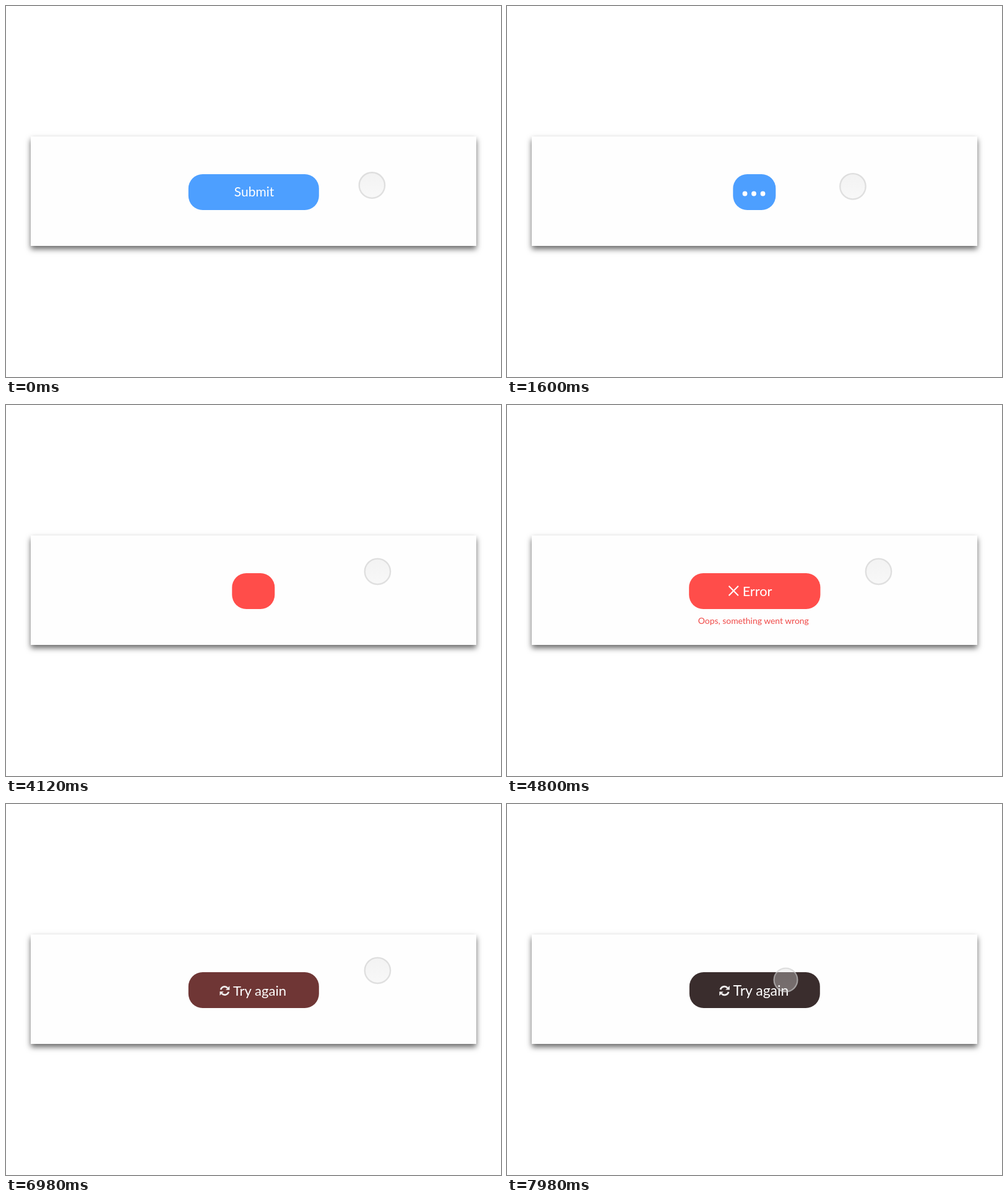
Animation of 800x600 px, one loop 8000 ms. Source, as an HTML page:

```html
<!DOCTYPE html>
<html lang="en">
<head>
<meta charset="utf-8">
<title>Submit button states</title>
<style>
  html, body { margin: 0; width: 100%; height: 100%; overflow: hidden; background: #fff; }
  #stage { position: relative; width: 800px; height: 600px; overflow: hidden; }
  #panel { position: absolute; left: 40px; top: 211px; width: 720px; height: 177px;
    background: #fefefe; box-shadow: 0 5px 9px rgba(0, 0, 0, .6); }
  svg { position: absolute; left: 0; top: 0; }
  text { font-family: Lato, "Open Sans", sans-serif; text-anchor: middle; fill: #fff; }
</style>
</head>
<body>
<div id="stage">
  <div id="panel"></div>
  <svg width="800" height="600" viewBox="0 0 800 600">
    <defs>
      <linearGradient id="glass" x1="0" y1="0" x2="0" y2="1">
        <stop offset="0" stop-color="#dcdcdc"/>
        <stop offset="1" stop-color="#ededed"/>
      </linearGradient>
    </defs>
    <text id="hint" x="398.3" font-size="13.9" style="fill:#f04a48">Oops, something went wrong</text>
    <rect id="button" y="272" height="58" rx="23"/>
    <g id="submit"><text x="401" y="308" font-size="21">Submit</text></g>
    <g id="dots" fill="#fff">
      <circle cx="384.5" r="3.9"/><circle cx="399" r="3.9"/><circle cx="413.5" r="3.9"/>
    </g>
    <g id="error">
      <path d="M361.5 293.5l14 14m0-14l-14 14" stroke="#fff" stroke-width="1.9"/>
      <text x="403.5" y="308" font-size="19.8">Error</text>
    </g>
    <g id="retry">
      <g id="sync" transform="translate(351.5 302)">
        <g id="half">
          <path d="M-6.6 -1.8A6.7 6.7 0 0 1 4.9 -4.6" fill="none" stroke="#f0eeee" stroke-width="2.7"/>
          <path d="M8.3 -8v6.6h-6.6z" fill="#f0eeee"/>
        </g>
        <use href="#half" transform="rotate(180)"/>
      </g>
      <text x="410.5" y="310.3" font-size="23">Try again</text>
    </g>
    <g id="cursor">
      <circle r="21.5" fill="url(#glass)" fill-opacity=".34"/>
      <circle r="20.7" fill="none" stroke="#cdcdcd" stroke-opacity=".55" stroke-width="2.4"/>
    </g>
  </svg>
</div>
<script>
const LOOP = 8000;
const BLUE = [77, 159, 255], RED = [255, 77, 74], DARK = [58, 45, 45];
const $ = id => document.getElementById(id);
const [hint, button, submit, error, retry, cursor, dots] =
  ['hint', 'button', 'submit', 'error', 'retry', 'cursor', 'dots'].map($);

const prog = (t, from, to) => Math.min(1, Math.max(0, (t - from) / (to - from)));
const mix = (a, b, p) => a + (b - a) * p;
const inOut = p => p < .5 ? 2 * p * p : 1 - 2 * (1 - p) ** 2;
const cubicOut = p => 1 - (1 - p) ** 3;
const mixColor = (a, b, p) => `rgb(${a.map((v, i) => Math.round(mix(v, b[i], p)))})`;

// Damped spring from 0 to 1 with about 15% overshoot
function spring(t, start) {
  if (t <= start) return 0;
  const w = 7.7 * (t - start) / 1000, k = .593;
  return 1 - Math.exp(-k * w) * (Math.cos(w) + k * Math.sin(w));
}

function scaleAt(el, x, y, s, opacity) {
  el.setAttribute('transform', `translate(${x} ${y}) scale(${s}) translate(${-x} ${-y})`);
  el.setAttribute('opacity', opacity);
}

function drawButton(t) {
  const shrink = inOut(prog(t, 1020, 1400));
  const width = t < 4140 ? mix(211, 69, shrink) : mix(69, 211, spring(t, 4140));
  button.setAttribute('x', 400.3 - width / 2 - (width < 140 ? .5 : 0));
  button.setAttribute('width', width);
  button.setAttribute('fill', t < 6000
    ? mixColor(BLUE, RED, prog(t, 3880, 4090))
    : mixColor(RED, DARK, cubicOut(prog(t, 6845, 7230))));
}

function drawDots(t) {
  dots.setAttribute('opacity', prog(t, 1340, 1480) * (1 - prog(t, 3860, 3980)));
  [...dots.children].forEach((dot, i) => {
    const p = t < 1808 ? 0 : prog((t - 1808) % 800, i * 200, i * 200 + 400);
    dot.setAttribute('cy', 303.5 - 9.5 * Math.sin(Math.PI * p) ** 2);
  });
}

function drawLabels(t) {
  scaleAt(submit, 401, 300, 1 - .3 * prog(t, 1020, 1160), 1 - prog(t, 1020, 1160));

  const leave = prog(t, 6500, 6640);
  scaleAt(error, 393, 300.5, spring(t, 4270) * (1 - .4 * leave), 1 - leave);

  const rise = prog(t, 6484, 6640) ** 1.15;
  hint.setAttribute('y', mix(306, 351, spring(t, 4500) * (1 - rise)));
  hint.setAttribute('opacity', t > 4500 && t < 6640 ? 1 : 0);

  const pop = prog(t, 6850, 7120);
  scaleAt(retry, 399, 302, mix(.7, 1, cubicOut(pop)), prog(t, 6850, 6950));
}

function drawCursor(t) {
  let x, y;
  if (t < 1220) {
    const s = inOut(prog(t, 330, 850));
    x = mix(591.5, 424, s);
    y = mix(290, 289, s);
  } else if (t < 7000) {
    const s = inOut(prog(t, 1220, 1800));
    x = mix(424, 600.5, s);
    y = 289 + 10 * Math.sin(Math.PI * s) - 19.7 * s ** 6;
  } else {
    const s = inOut(prog(t, 7150, 7825));
    x = mix(600.5, 450.5, s);
    y = mix(269.3, 284.5, s);
  }
  const press = prog(t, 940, 1000) - prog(t, 1040, 1140) + prog(t, 7960, 8010);
  cursor.setAttribute('transform', `translate(${x} ${y}) scale(${1 - .2 * press})`);
}

function frame() {
  const t = performance.now() % LOOP;
  drawButton(t);
  drawDots(t);
  drawLabels(t);
  drawCursor(t);
  requestAnimationFrame(frame);
}
frame();
</script>
</body>
</html>
```
